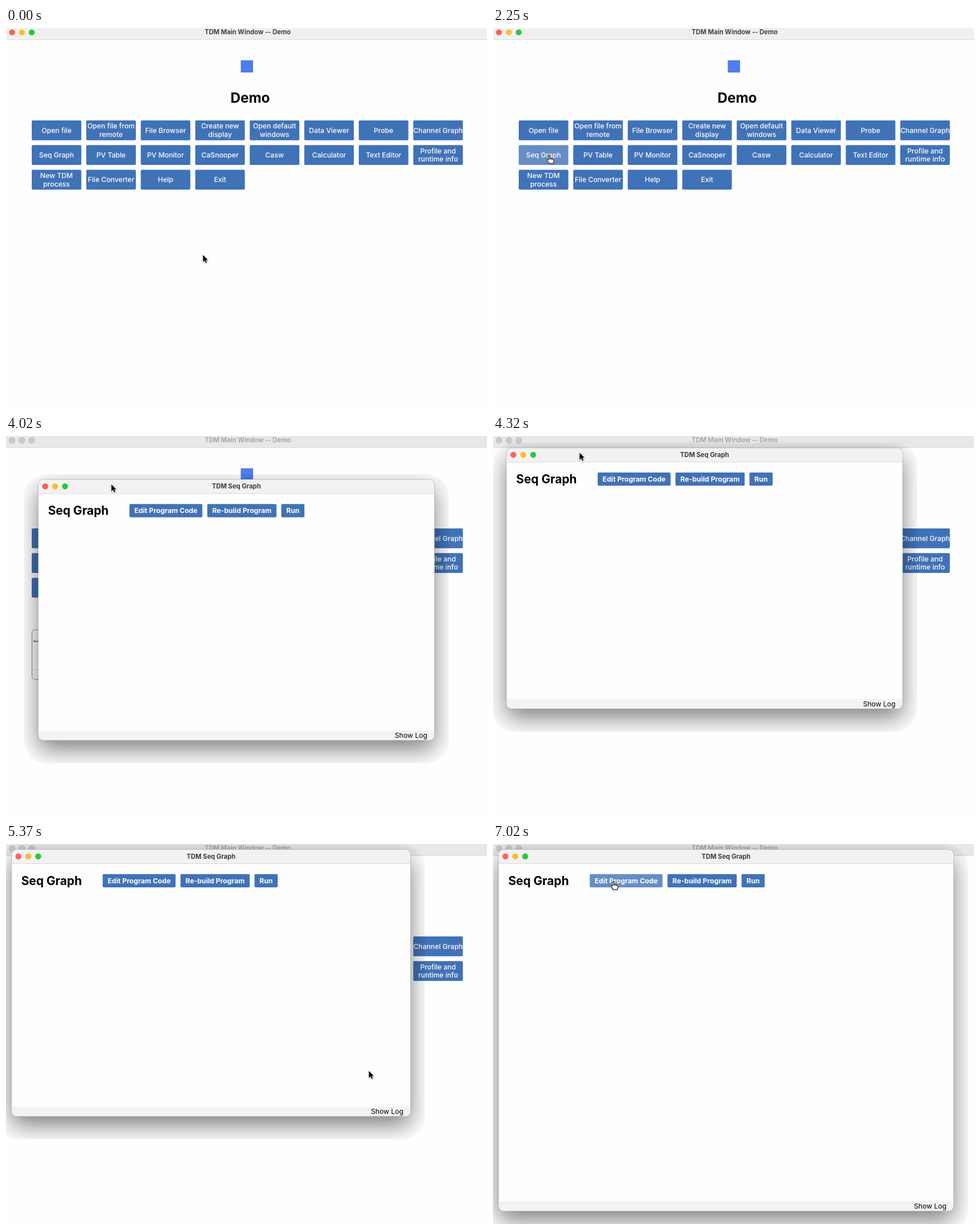
Recreate the animation shown at these times as an HTML page with a canvas. Size 841 by 666 pixels, loop 8 s.

```html
<!DOCTYPE html>
<html lang="en">
<head>
<meta charset="utf-8">
<title>TDM Seq Graph</title>
<style>
  html, body { margin: 0; width: 100%; height: 100%; overflow: hidden; background: #fefefe; }
  canvas { display: block; }
</style>
</head>
<body>
<canvas id="stage" width="841" height="666"></canvas>
<script>
const ctx = document.getElementById('stage').getContext('2d');
const LOOP = 8000, STEP = 150;
const OPEN = 2690, SHOWN = 2830, RELAYOUT = 5670;
const WHITE = '#fefefe', BLUE = '#4072b7', HOVER = '#668ec5';

const LABELS = [
  'Open file', 'Open file from|remote', 'File Browser', 'Create new|display',
  'Open default|windows', 'Data Viewer', 'Probe', 'Channel Graph',
  'Seq Graph', 'PV Table', 'PV Monitor', 'CaSnooper',
  'Casw', 'Calculator', 'Text Editor', 'Profile and|runtime info',
  'New TDM|process', 'File Converter', 'Help', 'Exit'
];
const mainButtons = LABELS.map((label, i) => ({
  label, x: 45 + 95.3 * (i % 8), y: 162 + 43.3 * Math.floor(i / 8), w: 86.7, h: 34.7, weight: 500
}));
const toolButtons = [['Edit Program Code', 159.6, 127.4], ['Re-build Program', 295.6, 121], ['Run', 425, 40.5]]
  .map(([label, x, w]) => ({ label, x, y: 43.2, w, h: 23.2, weight: 700 }));

// Held values: [start time, a, b]
const POSITIONS = [[0, 78, 112], [3870, 70, 98], [4020, 56.3, 76], [4170, 39, 46], [4320, 23.4, 20.7],
  [4470, 14, 12], [4620, 10.5, 10], [4770, 9.5, 9.5]];
const SIZES = [[0, 693, 457.5], [5370, 698, 468], [5520, 745, 550], [5670, 789.5, 620.5],
  [5820, 796, 633.5], [5970, 796, 634]];
const held = (table, t) => table.findLast(row => row[0] <= t).slice(1);

// Pointer moves: [start time, step count, x, y]
const MOVES = [[1050, 1, 341, 397], [1350, 7, 98.5, 223], [2980, 6, 205.5, 120],
  [4920, 3, 634, 397], [6270, 6, 210.5, 65.5]];

function pointerAt(t, win) {
  let x = 344, y = 397;
  for (const [start, count, toX, toY] of MOVES) {
    if (t < start) break;
    if (start === 4920) [x, y] = [win.x + 127.5, win.y + 8];
    const k = Math.min(Math.floor((t - start) / STEP) + 1, count) / count;
    const ease = k * k * (3 - 2 * k);
    x += (toX - x) * ease;
    y += (toY - y) * ease;
  }
  return t >= 3870 && t < 4920 ? { x: win.x + 127.5, y: win.y + 8 } : { x, y };
}

function text(str, x, y, size, weight, color, align = 'center') {
  ctx.font = `${weight} ${size}px Inter, sans-serif`;
  ctx.textAlign = align;
  ctx.fillStyle = color;
  ctx.fillText(str, x, y);
}

function rect(x, y, w, h, color) {
  ctx.fillStyle = color;
  ctx.fillRect(x, y, w, h);
}

function rounded(x, y, w, h, r) {
  ctx.beginPath();
  ctx.roundRect(x, y, w, h, r);
}

function lights(x, y, colors, outline) {
  colors.forEach((color, i) => {
    ctx.beginPath();
    ctx.arc(x + 17.3 * i, y, 5.2, 0, 7);
    ctx.fillStyle = color;
    ctx.fill();
    if (outline) {
      ctx.lineWidth = 0.8;
      ctx.strokeStyle = outline;
      ctx.stroke();
    }
  });
}
const LIT = ['#ff5f57', '#febc2e', '#28c840'];
const UNLIT = Array(3).fill('#c9cac9');

const inside = (p, b) => p.x >= b.x && p.x <= b.x + b.w && p.y >= b.y && p.y <= b.y + b.h;

// Draws the buttons and tells whether the pointer is over one of them
function drawButtons(buttons, pointer) {
  let any = false;
  for (const b of buttons) {
    const over = pointer && inside(pointer, b);
    any ||= over;
    rounded(b.x, b.y, b.w, b.h, 1.8);
    ctx.fillStyle = over ? HOVER : BLUE;
    ctx.fill();
    const lines = b.label.split('|');
    lines.forEach((line, i) => text(line, b.x + b.w / 2,
      b.y + b.h / 2 + 4.4 + (i - (lines.length - 1) / 2) * 14.6, 12.13, b.weight, '#fff'));
  }
  return any;
}

function drawMain(active, pointer) {
  rect(0, 0, 841, 666, WHITE);
  rect(0, 0, 841, 20, active ? '#f0f0f0' : '#e7e8e7');
  rect(0, 20, 841, 1, active ? '#dcdcdc' : '#d9dad9');
  lights(10.4, 7.6, active ? LIT : UNLIT, active ? null : '#b3b4b3');
  text('TDM Main Window -- Demo', 422.5, 11, 11.2, 700, active ? '#404040' : '#a6a7a6');
  rect(410.5, 56.5, 21.5, 21.5, '#4f7df0');
  text('Demo', 427, 131, 24.2, 700, '#000');
  return drawButtons(mainButtons, pointer);
}

function drawGhost() {
  rounded(45.5, 339.5, 133, 87, 5);
  ctx.fillStyle = WHITE;
  ctx.fill();
  ctx.lineWidth = 1;
  ctx.strokeStyle = '#8a8a8a';
  ctx.stroke();
  rect(46, 409, 132, 1, '#e6e6e6');
  text('Seq Graph', 48, 360.5, 3.2, 700, '#000', 'left');
}

function drawChild(t, win, pointer) {
  const { x, y, w, h } = win;
  ctx.save();
  rounded(x - 25, y - 9, w + 50, h + 49, 40);
  ctx.clip();
  ctx.shadowColor = 'rgba(0,0,0,.5)';
  ctx.shadowBlur = 40;
  ctx.shadowOffsetY = 16;
  rounded(x, y, w, h, 8.7);
  ctx.fillStyle = WHITE;
  ctx.fill();
  ctx.restore();

  // The content may be laid out larger than the frame; it hangs on the bottom edge
  const [cw, ch] = t >= RELAYOUT ? [796, 634] : [w, h];
  const top = y + h - ch;
  ctx.save();
  rounded(x, y, w, h, 8.7);
  ctx.clip();
  ctx.translate(x, top);
  rect(0, 0, cw, 24.5, '#f2f2f2');
  rect(0, 24.5, cw, 1, '#dadada');
  lights(12.2, 12.2, LIT);
  text('TDM Seq Graph', cw / 2, 16, 11.2, 700, '#3c3c3c');
  text('Seq Graph', 17.2, 62.4, 20.8, 700, '#000', 'left');
  const over = drawButtons(toolButtons, { x: pointer.x - x, y: pointer.y - top });
  rect(0, ch - 17.3, cw, 17.3, '#f3f3f3');
  text('Show Log', cw - 12.6, ch - 4.4, 12.13, 400, '#000', 'right');
  ctx.restore();

  rounded(x, y, w, h, 8.7);
  ctx.lineWidth = 0.8;
  ctx.strokeStyle = 'rgba(0,0,0,.25)';
  ctx.stroke();
  return over;
}

const ARROW = new Path2D('M.5.8V12.800L3.300 10.200 5.300 14.600 7.300 13.700 5.400 9.400H9Z');
const HAND = new Path2D('M-1.300 8V1a1.200 1.200 0 0 1 2.400 0V5l5 1q2 .6 2 2.600-.2 3-1.500 5.600H-.4Q-1.800 11.500-4 9.200-4.500 7.500-3 7.200Z');
const KNUCKLES = new Path2D('M1.100 5v2.500M3.500 5.600v2.200M5.800 6v2.200');

function drawPointer({ x, y }, hand) {
  ctx.save();
  ctx.translate(x, y);
  ctx.lineJoin = 'round';
  ctx.save();
  ctx.shadowColor = 'rgba(0,0,0,.35)';
  ctx.shadowBlur = 2;
  ctx.shadowOffsetY = 1;
  ctx.strokeStyle = '#fff';
  ctx.lineWidth = hand ? 2 : 1.6;
  ctx.stroke(hand ? HAND : ARROW);
  ctx.restore();
  ctx.fillStyle = hand ? '#fff' : '#000';
  ctx.fill(hand ? HAND : ARROW);
  if (hand) {
    ctx.strokeStyle = '#000';
    ctx.lineWidth = 1.1;
    ctx.stroke(HAND);
    ctx.stroke(KNUCKLES);
  }
  ctx.restore();
}

function draw(now) {
  const t = now % LOOP;
  const [x, y] = held(POSITIONS, t);
  const [w, h] = held(SIZES, t);
  const win = { x, y, w, h };
  const pointer = pointerAt(t, win);
  const opened = t >= OPEN;
  let hand = drawMain(!opened, opened ? null : pointer);
  if (opened) drawGhost();
  if (t >= SHOWN) hand = drawChild(t, win, pointer);
  drawPointer(pointer, hand);
}

const begin = performance.now();
function frame() {
  draw(performance.now() - begin);
  requestAnimationFrame(frame);
}
frame();
</script>
</body>
</html>
```
